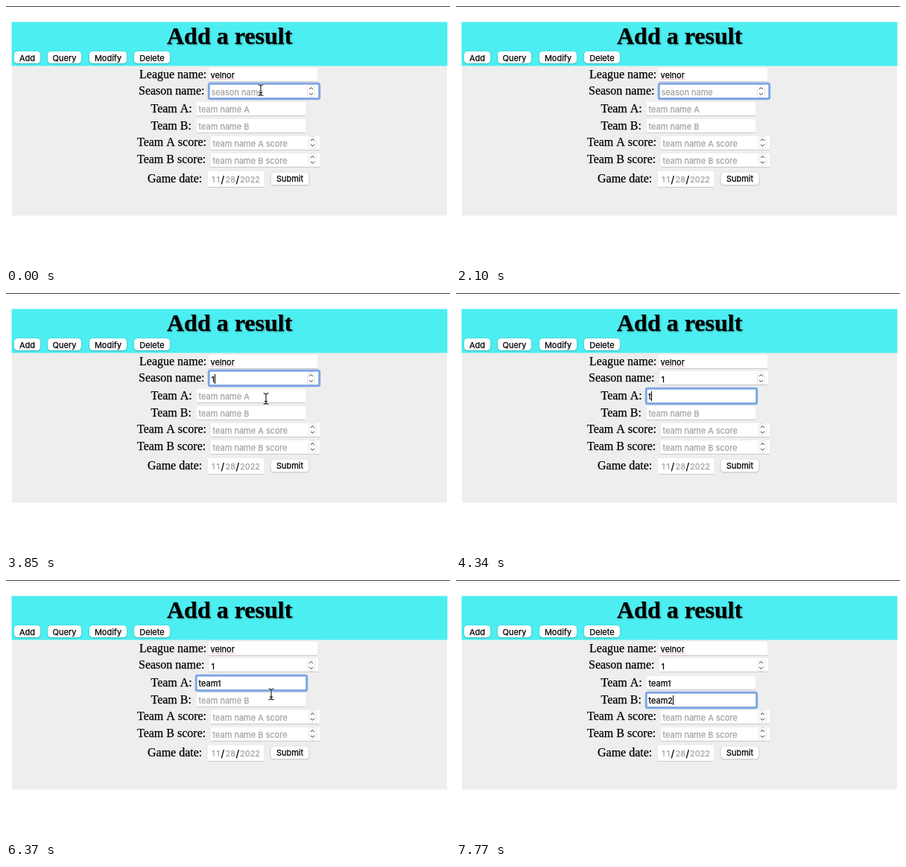
An HTML page with a canvas for the animation above (8 s loop, 596 px wide and 348 px high).

```html
<!DOCTYPE html>
<html lang="en">
<head>
<meta charset="utf-8">
<title>Add a result</title>
<style>
html, body { margin: 0; width: 100%; height: 100%; overflow: hidden; background: #fff; }
canvas { display: block; }
</style>
</head>
<body>
<canvas id="stage" width="596" height="348"></canvas>
<script>
const ctx = document.getElementById('stage').getContext('2d');
const LOOP = 8000, STEP = 70;
const SERIF = '"Liberation Serif", "Times New Roman", serif';
const UI = '11px Inter, "Open Sans", sans-serif';
const GREY = '#a2a2a2', INK = '#000';

// label with its position, input box, text baseline, placeholder, spinner x
const rows = [
  { label: 'League name:', lx: 179, ly: 96.5, x: 272, y: 83, base: 97 },
  { label: 'Season name:', lx: 178, ly: 118.5, x: 273, y: 105, base: 120, hint: 'season name', spin: 409.5 },
  { label: 'Team A:', lx: 194.5, ly: 142.5, x: 256, y: 129, base: 143, hint: 'team name A' },
  { label: 'Team B:', lx: 194.5, ly: 165.5, x: 256, y: 152, base: 166, hint: 'team name B' },
  { label: 'Team A score:', lx: 176, ly: 187.5, x: 275, y: 175, base: 189, hint: 'team name A score', spin: 411.5 },
  { label: 'Team B score:', lx: 176, ly: 210.5, x: 275, y: 198, base: 212, hint: 'team name B score', spin: 411.5 }
];
const FIELD_W = 146, FIELD_H = 19;
const [SEASON, TEAM_A, TEAM_B] = [1, 2, 3];

const keys = {
  [SEASON]: ['1', [2800]],
  [TEAM_A]: ['team1', [4340, 4550, 4760, 5040, 5600]],
  [TEAM_B]: ['team2', [6930, 7140, 7280, 7490, 7770]]
};
const focusTimes = [[SEASON, -1000], [TEAM_A, 3990], [TEAM_B, 6580]];
const caretToggles = [490, 1050, 1540, 2100, 2590, 3290, 3850, 5530, 5600, 6090, 6580];

// pointer visibility spans with [time, x, y] waypoints
const pointer = [
  { to: 1400, path: [[0, 342, 113]] },
  { to: 4340, path: [[3360, 342, 113], [3570, 350, 142], [3710, 353, 158], [3850, 349, 142], [4130, 352, 140]] },
  { to: 7000, path: [[6090, 352, 140], [6440, 357, 157], [6720, 355.5, 158.5]] }
];

// a hairline outline gives the slightly heavier strokes of desktop text
function text(str, x, y, font = UI, color = INK) {
  ctx.font = font;
  ctx.fillStyle = ctx.strokeStyle = color;
  ctx.lineWidth = 0.25;
  ctx.lineJoin = 'round';
  ctx.fillText(str, x, y);
  ctx.strokeText(str, x, y);
}

function rect(x, y, w, h, color) {
  ctx.fillStyle = color;
  ctx.fillRect(x, y, w, h);
}

function line(points, width, color) {
  ctx.beginPath();
  points.forEach(([x, y]) => ctx.lineTo(x, y));
  ctx.lineWidth = width;
  ctx.strokeStyle = color;
  ctx.stroke();
}

function inputBox(x, y, w, h) {
  rect(x, y, w, h, '#fff');
  rect(x, y + h - 1, w, 1, '#c9c9c9');
}

function button(label, x, y, w, h) {
  ctx.save();
  ctx.shadowColor = 'rgba(0,0,0,.35)';
  ctx.shadowBlur = 2;
  ctx.shadowOffsetY = 0.5;
  ctx.fillStyle = '#fff';
  ctx.beginPath();
  ctx.roundRect(x, y, w, h, 4.5);
  ctx.fill();
  ctx.restore();
  ctx.textAlign = 'center';
  text(label, x + w / 2, y + 12.5);
  ctx.textAlign = 'left';
}

function spinner(x, y) {
  ctx.fillStyle = '#fff';
  ctx.beginPath();
  ctx.roundRect(x - 5, y - 8, 10, 16, 4);
  ctx.fill();
  ctx.lineWidth = 0.6;
  ctx.strokeStyle = '#d4d4d4';
  ctx.stroke();
  for (const s of [-1, 1]) {
    line([[x - 2.4, y + s * 2.5], [x, y + s * 5], [x + 2.4, y + s * 2.5]], 1, '#333');
  }
}

function focusRing(f, age) {
  const grow = 3 * Math.max(0, 1 - age / 140);
  const pad = 0.75 + grow;
  ctx.globalAlpha = 1 - grow / 5;
  ctx.beginPath();
  ctx.roundRect(f.x - pad, f.y - pad, FIELD_W + 1 + 2 * pad, FIELD_H + 2 * pad, 2 + grow);
  ctx.lineWidth = 3;
  ctx.strokeStyle = '#7fa6e3';
  ctx.stroke();
  ctx.globalAlpha = 1;
}

function iBeam(x, y) {
  const draw = (width, color) => {
    ctx.beginPath();
    for (const s of [-1, 1]) {
      ctx.moveTo(x - 3.5, y + s * 7.3);
      ctx.quadraticCurveTo(x, y + s * 7.3, x, y + s * 5);
      ctx.quadraticCurveTo(x, y + s * 7.3, x + 3.5, y + s * 7.3);
    }
    ctx.moveTo(x, y - 6);
    ctx.lineTo(x, y + 6);
    ctx.moveTo(x - 2, y + 3.5);
    ctx.lineTo(x + 2, y + 3.5);
    ctx.lineWidth = width;
    ctx.strokeStyle = color;
    ctx.stroke();
  };
  draw(2.2, 'rgba(255,255,255,.6)');
  draw(1.1, '#111');
}

function along(path, t) {
  const i = path.findIndex(p => p[0] > t);
  if (i < 0) return path[path.length - 1].slice(1);
  const [t0, x0, y0] = path[i - 1], [t1, x1, y1] = path[i];
  const k = (t - t0) / (t1 - t0);
  return [x0 + (x1 - x0) * k, y0 + (y1 - y0) * k];
}

function typed(i, t) {
  if (!keys[i]) return '';
  const [word, times] = keys[i];
  return word.slice(0, times.filter(k => k <= t).length);
}

function page() {
  rect(0, 0, 596, 348, '#fff');
  rect(0, 0, 596, 1, '#454545');
  rect(8, 80, 584, 201.5, '#eee');
  rect(7.5, 21.5, 585, 59, '#4deef1');

  ctx.save();
  ctx.shadowColor = 'rgba(0,0,0,.3)';
  ctx.shadowBlur = 2;
  ctx.shadowOffsetX = ctx.shadowOffsetY = 1;
  text('Add a result', 216, 50.5, 'bold 32px ' + SERIF);
  ctx.restore();

  button('Add', 11, 61, 35, 16);
  button('Query', 56, 61, 45, 16);
  button('Modify', 112, 61, 50, 16);
  button('Delete', 172, 61, 48, 16);
}

function dateRow() {
  text('Game date:', 190, 236.5, '16px ' + SERIF);
  inputBox(271, 222, 75, 22);
  text('1', 276, 237, UI, GREY);
  text('1', 282.5, 237, UI, GREY);
  text('28', 294.5, 237, UI, GREY);
  text('2022', 314, 237, UI, GREY);
  for (const x of [288.5, 308.5]) text('/', x, 238, '13px Inter, sans-serif');
  button('Submit', 355.5, 223.5, 51, 17);
}

function field(f, i, t, focus) {
  const x = f.x + 2.5;
  text(f.label, f.lx, f.ly, '16px ' + SERIF);
  inputBox(f.x, f.y, FIELD_W, FIELD_H);
  if (f.spin) spinner(f.spin, f.base - 5.5);
  if (i === focus[0]) focusRing(f, t - focus[1]);

  const value = i ? typed(i, t) : 'velnor';
  text(value || f.hint, x, f.base, UI, value ? INK : GREY);
  if (!i) {
    for (let d = 0; d < 33; d += 2) rect(x + d, 98, 1, 1, 'rgba(235,70,60,.6)');
  }
  const caretOn = caretToggles.filter(k => k <= t).length % 2;
  if (i === focus[0] && caretOn) {
    const w = value ? ctx.measureText(value).width : 0;
    rect(Math.round(x + w), f.base - 11, 1, 13, INK);
  }
}

function render(t) {
  const focus = focusTimes.filter(f => f[1] <= t).pop();
  page();
  rows.forEach((f, i) => field(f, i, t, focus));
  dateRow();
  const span = pointer.find(p => t >= p.path[0][0] && t < p.to);
  if (span) iBeam(...along(span.path, t));
}

const start = performance.now();
function tick() {
  const t = (performance.now() - start) % LOOP;
  render(Math.floor(t / STEP) * STEP);
  requestAnimationFrame(tick);
}
tick();
</script>
</body>
</html>
```
